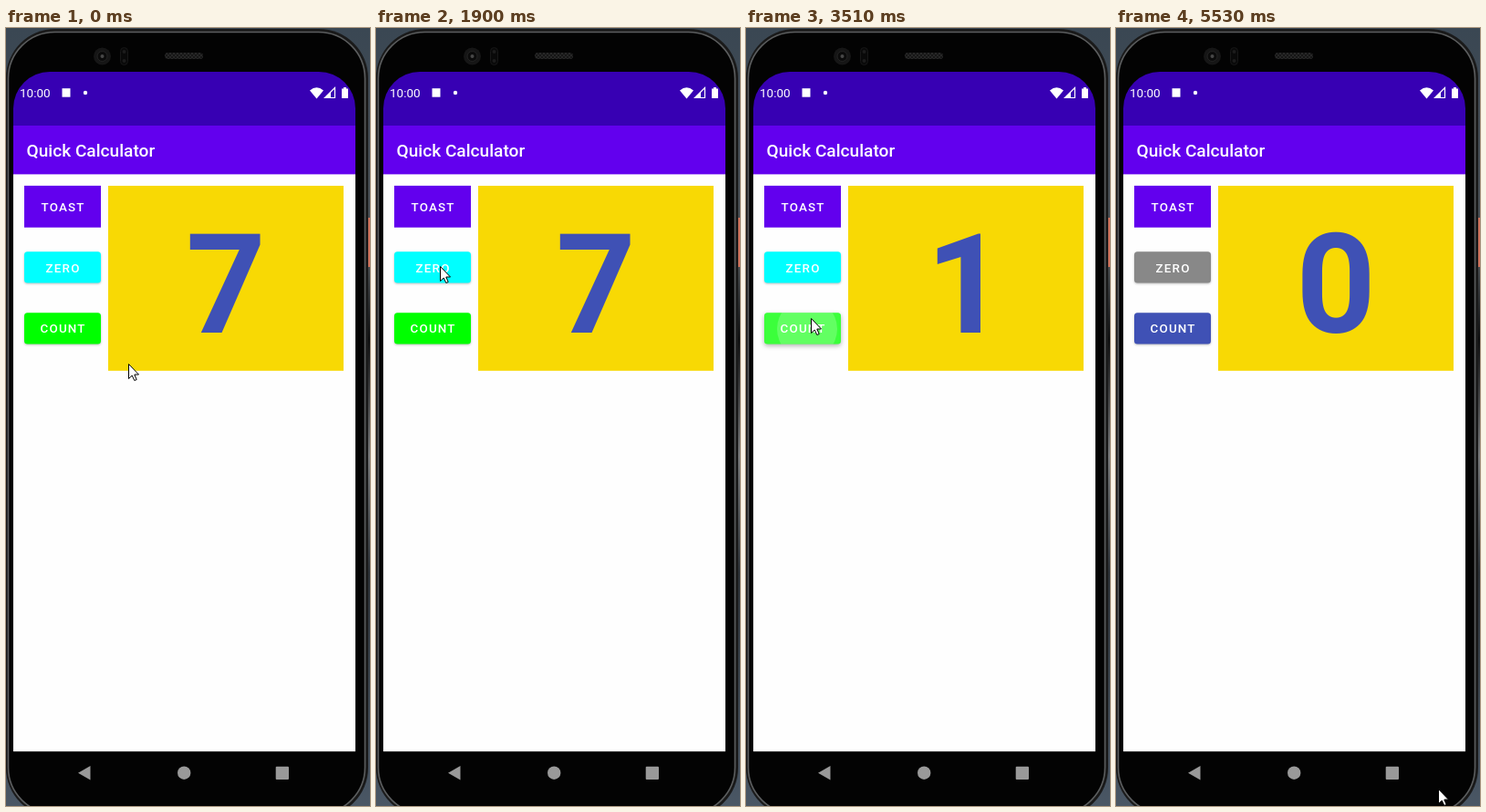
Recreate the animation shown at these times as an HTML page. Size 399 by 853 pixels, loop 5940 ms.

```html
<!DOCTYPE html>
<html lang="en">
<head>
<meta charset="utf-8">
<title>Counter app</title>
<style>
  html, body { margin: 0; width: 100%; height: 100%; overflow: hidden; background: #000; }
  svg { display: block; width: 399px; height: 853px; font-family: Roboto, sans-serif; }
  .label { font-size: 13.4px; font-weight: 500; letter-spacing: .0893em; fill: #fff; text-anchor: middle; }
  .button { filter: drop-shadow(0 1px 1px rgba(0, 0, 0, .25)); }
  .button.lifted { filter: drop-shadow(0 2.5px 2.5px rgba(0, 0, 0, .3)); }
</style>
</head>
<body>
<svg viewBox="0 0 399 853">
  <defs>
    <linearGradient id="desk" x2="0" y2="1">
      <stop offset="0" stop-color="#3a4753"/>
      <stop offset=".3" stop-color="#4b5054"/>
      <stop offset=".4" stop-color="#0c0d0e"/>
      <stop offset=".55" stop-color="#77797b"/>
      <stop offset=".7" stop-color="#2a3036"/>
      <stop offset="1" stop-color="#4a5765"/>
    </linearGradient>
    <pattern id="mesh" width="4" height="4" patternUnits="userSpaceOnUse">
      <path d="M0 0L4 4M4 0L0 4" stroke="#2c2c2c" stroke-width=".8"/>
    </pattern>
    <clipPath id="zeroClip"><rect x="20" y="245.2" width="84" height="34.4" rx="3.5"/></clipPath>
    <clipPath id="countClip"><rect x="20" y="312.2" width="84" height="34.4" rx="3.5"/></clipPath>
  </defs>

  <!-- Phone body -->
  <rect width="399" height="853" fill="url(#desk)"/>
  <rect x="396" y="208" width="3" height="54" fill="#cf725b"/>
  <rect x="0" y="1" width="397" height="864" rx="54" fill="#1a1a1a"/>
  <rect x="2.5" y="4.5" width="391" height="857" rx="51" fill="#030303" stroke="#5c5e5f" stroke-width="1.6"/>
  <circle cx="105.5" cy="31" r="9.5" fill="#161616"/>
  <circle cx="105.5" cy="31" r="5.5" fill="#0b0b0b" stroke="#242424"/>
  <circle cx="105.5" cy="31" r="2" fill="#484848"/>
  <rect x="125.5" y="21.5" width="8" height="19" rx="4" fill="#090909" stroke="#171717"/>
  <circle cx="129.5" cy="26" r="2" fill="#1c1c1c"/>
  <circle cx="129.5" cy="36" r="2" fill="#1c1c1c"/>
  <rect x="174" y="27" width="42" height="7" rx="3.5" fill="#161616"/>
  <rect x="174" y="27" width="42" height="7" rx="3.5" fill="url(#mesh)"/>

  <!-- Screen -->
  <rect x="8" y="106" width="375" height="687.2" fill="#fefefe"/>
  <path d="M8 107V88A40 40 0 0 1 48 48H343A40 40 0 0 1 383 88V107Z" fill="#3700b3"/>
  <rect x="8" y="107" width="375" height="53.4" fill="#6200ee"/>
  <g fill="#fff">
    <text x="15" y="76.4" font-size="13.5">10:00</text>
    <rect x="61.5" y="66.2" width="9" height="9.5"/>
    <circle cx="87" cy="71" r="2.2"/>
    <path d="M333 68.5Q340.5 62 348 68.5L340.5 77.5Z"/>
    <path d="M360.5 65.5V76.5H349.5Z" fill="none" stroke="#fff" stroke-width="1.2"/>
    <path d="M349 77L356 70V77Z"/>
    <path d="M370 65H373V66.5H375V77H368V66.5H370Z"/>
    <text x="22.5" y="141.3" font-size="19.1" font-weight="500">Quick Calculator</text>
  </g>
  <g fill="#999">
    <path d="M79 816.7L92.5 809V824.5Z"/>
    <circle cx="195.2" cy="816.7" r="7.2"/>
    <rect x="295.7" y="809.7" width="14.3" height="14.3" rx="1"/>
  </g>

  <!-- App -->
  <rect x="20" y="172.9" width="84" height="45.8" fill="#6200ee"/>
  <rect x="112" y="173" width="258" height="202.8" fill="#f8d904"/>
  <text id="number" x="241" y="334.4" font-size="152.7" font-weight="700" text-anchor="middle" fill="#3f51b5">7</text>
  <rect id="zero" class="button" x="20" y="245.2" width="84" height="34.4" rx="3.5"/>
  <rect id="count" class="button" x="20" y="312.2" width="84" height="34.4" rx="3.5"/>
  <g id="ripple" fill="#fff">
    <rect id="glow" x="20" y="245" width="84" height="102"/>
    <circle id="wave" cx="67" cy="330"/>
  </g>
  <text class="label" x="62.6" y="201.2">TOAST</text>
  <text class="label" x="62.6" y="267.7">ZERO</text>
  <text class="label" x="62.6" y="334.3">COUNT</text>

  <path id="cursor" d="M.5 .5V16.5L4.2 13L6.8 18.5L9.2 17.5L6.8 12H11.5Z" fill="#fff" stroke="#000"/>
</svg>
<script>
const LOOP = 5940;
const MOVE_STEP = 125, TOUCH_STEP = 120;
const $ = id => document.getElementById(id);
const set = (id, name, value) => $(id).setAttribute(name, value);

// Pointer legs: start time, number of jumps, x and y reached
const legs = [
  [120, 3, 204, 607], [620, 1, 100, 452], [740, 2, 95, 277], [1010, 3, 71, 248],
  [1900, 1, 70, 261], [2630, 2, 71, 308], [2930, 2, 71, 318], [3760, 3, 75, 269],
  [4720, 1, 106, 321], [4870, 2, 289, 678], [5140, 2, 319, 781], [5410, 2, 387, 887]
];

// A press shows its value one touch step after it starts.
const presses = [
  { time: 2360, button: "zero", value: 0, wave: 0 },
  { time: 3360, button: "count", value: 1, wave: .2 },
  { time: 4330, button: "zero", value: 0, wave: 0 }
];

function pointer(ms) {
  let x = 134, y = 368;
  for (const [start, jumps, toX, toY] of legs) {
    if (ms < start) break;
    const part = Math.min(1, (Math.floor((ms - start) / MOVE_STEP) + 1) / jumps);
    x += (toX - x) * part;
    y += (toY - y) * part;
  }
  return [Math.round(x), Math.round(y)];
}

function draw(ms) {
  const done = presses.findLast(press => ms >= press.time + TOUCH_STEP);
  const value = done ? done.value : 7;
  set("zero", "fill", value ? "#0ff" : "#888");
  set("count", "fill", value ? "#0f0" : "#3f51b5");
  $("number").textContent = value;

  // Feedback swells and fades over three steps.
  const touch = presses.find(({ time }) => ms >= time && ms < time + 3 * TOUCH_STEP);
  const step = touch ? Math.floor((ms - touch.time) / TOUCH_STEP) : 0;
  const swell = touch ? Math.sin(Math.PI * (step + .5) / 3) : 0;
  for (const id of ["zero", "count"]) $(id).classList.toggle("lifted", touch?.button === id);
  set("ripple", "clip-path", touch ? `url(#${touch.button}Clip)` : "none");
  set("glow", "opacity", .23 * swell);
  set("wave", "opacity", touch ? touch.wave * swell : 0);
  set("wave", "r", 22 + 11 * step);

  set("cursor", "transform", `translate(${pointer(ms)})`);
}

const start = performance.now();
function tick() {
  draw((performance.now() - start) % LOOP);
  requestAnimationFrame(tick);
}
tick();
</script>
</body>
</html>
```
